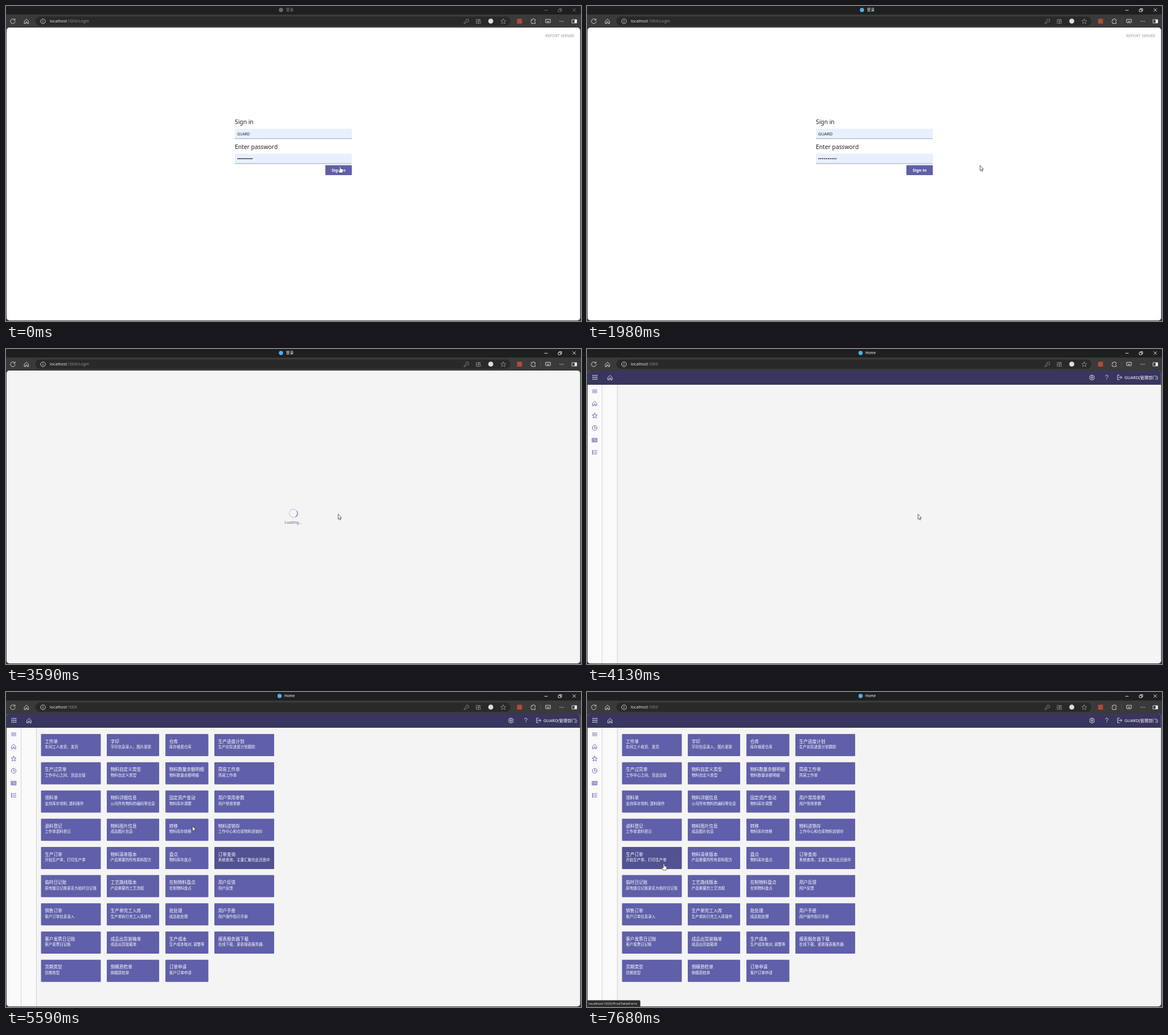
These frames come from a looping animation (1010 px wide and 555 px high, 8 s). An HTML page:

```html
<!DOCTYPE html>
<html lang="zh-CN">
<head>
<meta charset="utf-8">
<title>Home</title>
<style>
html, body { margin: 0; width: 100%; height: 100%; overflow: hidden; background: #3a3a3a; }
svg { display: block; width: 1010px; height: 555px; }
text { font-family: "Noto Sans", "Noto Sans CJK SC", "Noto Sans CJK", sans-serif; white-space: pre; }
.ico { fill: none; stroke: #ddd; stroke-width: .9; stroke-linecap: round; stroke-linejoin: round; }
.dim { stroke: #8c8c8c; }
.rail { stroke: #5c5bb0; }
.white { stroke: #eee; }
</style>
</head>
<body>
<svg id="stage" viewBox="0 0 1010 555" xmlns="http://www.w3.org/2000/svg"></svg>
<script>
const LOOP = 8000, PURPLE = '#605fa9', HOVER = '#525192', PRESSED = '#4a4985';
const USER = 'GUARD';

const text = (x, y, size, fill, s, more = '') =>
  `<text x="${x}" y="${y}" font-size="${size}" fill="${fill}" ${more}>${s}</text>`;
const rect = (x, y, w, h, fill, more = '') =>
  `<rect x="${x}" y="${y}" width="${w}" height="${h}" fill="${fill}" ${more}/>`;
const icon = (x, y, d, cls = '') =>
  `<path class="ico ${cls}" transform="translate(${x} ${y})" d="${d}"/>`;

const STAR = 'M0 -4.6L1.3 -1.4 4.5 -1.3 2 .9 2.9 4.1 0 2.3 -2.9 4.1 -2 .9 -4.5 -1.3 -1.3 -1.4Z';
const HOUSE = 'M-3.6 -.4L0 -3.9 3.6 -.4V4H1.2V1H-1.2V4H-3.6Z';
const circle = r => `M${-r} 0a${r} ${r} 0 1 1 ${2 * r} 0a${r} ${r} 0 1 1 ${-2 * r} 0`;

// Tile columns: x, width, then "title/subtitle" (subtitle defaults to title)
const columns = [
  [61.5, 105, '工作单/车间工人收货、发货 生产过货单/工作中心之间、货品交接 领料单/支持库存领料,_退料操作 退料登记/工作单退料登记 生产订单/开始生产单，打印生产单 临时日记账/原电镀日记账更名为临时日记账 销售订单/客户订单信息录入 客户发票日记账 货期类型'],
  [177, 92, '字印/字印信息录入，图片更新 物料自定义类型 物料详细信息/公司所有物料的编码等信息 物料图片信息/成品图片信息 物料清单版本/产品需要的所有原料配方 工艺路线版本/产品需要的工艺流程 生产单完工入库/生产单执行完工入库操作 成品出货装箱单 倒模质检单'],
  [280, 75.5, '仓库/库存维度仓库 物料数量余额明细 固定资产变动/物料库存调整 转移/物料库存转移 盘点/物料库存盘点 在制物料盘点 批处理/成品批处理 生产成本/生产成本核对,_调整等 订单申请/客户订单申请'],
  [366, 105, '生产进度计划/生产实际进度计划跟踪 简易工作单 用户常用参数 物料进销存/工作中心和仓库物料进销存 订单查询/系统查询，主要汇聚在此页面中 用户反馈 用户手册/用户操作指引手册 报表服务器下载/在线下载、更新报表服务器.']
];
const tiles = columns.flatMap(([x, w, list]) => list.split(' ').map((item, i) => {
  const [title, sub = title] = item.replace('_', ' ').split('/');
  return { x, y: 74 + 49.72 * i, w, h: 39, title, sub };
}));
const button = { x: 561, y: 280.5, w: 46.5, h: 17.5 };

const chrome =
  rect(0, 0, 1010, 555, '#3a3a3a') + rect(0, 0, 1010, 15, '#1e2020') +
  rect(51, 18, 835.5, 17.5, '#292929', 'rx="8.7" stroke="#444" stroke-width=".6"') +
  icon(12, 27, 'M3.6 -2.3A4.2 4.2 0 1 0 4.2 .4M3.8 -4.4V-2H1.4') +
  icon(36, 27, HOUSE) +
  icon(65, 27, circle(4.2) + 'M0 -.4V2M0 -2V-1.9') +
  icon(808.5, 27, 'M-3.8 3.8V2.2L-.6 -.8A2.5 2.5 0 1 1 1.2 1L-.6 2.4 -2 3.8Z', 'dim') +
  icon(830, 27, 'M-3.6 -3.4H-.2V3.6H-3.6ZM-3.6 .1H3.4V3.6H-.2M2 -4V-.8M.4 -2.4H3.6', 'dim') +
  '<circle cx="851.5" cy="26.7" r="4.4" fill="#ddd"/>' +
  icon(873.5, 27, STAR, 'dim') +
  rect(897.7, 22.5, 8.6, 8.6, '#b5483c') +
  icon(926, 27, 'M-3 -3H-1A1.5 1.5 0 0 1 2 -3H3.5V-.8A1.4 1.4 0 0 0 3.5 1.8V3.8H-3V1.8A1.5 1.5 0 0 1 -3 -1Z') +
  rect(938.6, 22, .8, 10, '#555') +
  icon(952, 27, 'M-2 2H-4.2V-3.6H4.2V2H2M-1.8 -1.2L1.8 3.4M1.8 -1.2L-1.8 3.4') +
  [-3, 0, 3].map(d => `<circle cx="${976 + d}" cy="27" r=".75" fill="#ddd"/>`).join('') +
  icon(998.5, 27, 'M-4 -3H4V3H-4Z') + rect(998.7, 24, 3.8, 6, '#eee') +
  `<g id="buttons" class="ico">
    <path d="M946 7.5h5M970.5 6h4v4h-4zM972 6V4.6h4V8.600h-1.500M995.600 4.600l5 5M1000.600 4.600l-5 5"/></g>
  <circle id="gem" cy="7" r="3.7"/>
  <text id="title" y="9.3"></text>
  <text x="77" y="29.300" font-size="7.06" fill="#e6e6e6">localhost<tspan id="path" fill="#929292"></tspan></text>`;

const field = y => rect(402, y, 205.5, 18, '#e8f0fd') + rect(402, y + 17.4, 205.5, .8, '#8794b4');
const login = '<g id="login">' + rect(1, 38, 1007.5, 516, '#fff', 'rx="5"') +
  text(947, 54.6, 6.8, '#9a9a9a', 'REPORT SERVER') +
  text(402, 208, 10.3, '#222', 'Sign in') + field(216) +
  text(402, 252, 10.3, '#222', 'Enter password') + field(260) +
  text(406, 228, 7.4, '#222', USER, 'id="user"') + '<g id="dots" fill="#222"></g>' +
  rect(button.x, button.y, button.w, button.h, PURPLE, 'id="button" rx="1"') +
  text(584.2, 291.8, 7.3, '#fff', 'Sign in', 'text-anchor="middle" font-weight="600"') + '</g>';

const header = '<path d="M1 63V43a5 5 0 0 1 5 -5H1003.500a5 5 0 0 1 5 5V63Z" fill="#38365f"/>' +
  Array.from({ length: 9 }, (_, i) =>
    rect(9.8 + 3.3 * (i % 3), 45.8 + 3.3 * (i / 3 | 0), 1.7, 1.7, '#fff')).join('') +
  icon(40.5, 50.3, HOUSE, 'white') +
  icon(887, 50.3, circle(1.5) + 'M-1 -4.3H1L1.5 -3 3 -3.300 4.200 -1.600 3.400 0 4.200 1.600 3 3.300 1.500 3 1 4.300H-1L-1.500 3 -3 3.300 -4.200 1.600 -3.400 0 -4.200 -1.600 -3 -3.300 -1.500 -3Z', 'white') +
  icon(913, 50, 'M-2 -2.2A2 2 0 1 1 1.300 -.6Q0 .3 0 1.600M0 3.700V3.800', 'white') +
  icon(935.5, 50, 'M-.5 -4H-3.500V4H-.5M-1.500 0H4M1.800 -2.200L4 0 1.800 2.200', 'white') +
  text(944, 53, 7.35, '#fff', USER + '(管理部门)');

const rail = [
  'M-4 -2.4H4M-4 0H4M-4 2.400H4', HOUSE, STAR, circle(4.2) + 'M0 -2.600V.3H2.300',
  'M-4.200 -3.200H4.200V3.400H-4.200ZM-4.200 -1.400H4.200M-2.600 .2H-.4V2H-2.600ZM1 .2H2.800M1 2H2.800',
  'M-3.800 -3.600V3.600M-3.800 -3H-2.400M-3.800 0H-2.400M-3.800 3H-2.400M-.8 -3H4M-.8 0H4M-.8 3H4'
].map((d, i) => icon(13.5, 74.5 + 21.5 * i, d, 'rail')).join('');

const home = rect(1, 38, 1007.5, 516, '#f4f4f4', 'id="gray" rx="5"') + '<g id="home">' +
  '<path d="M1 63H27V554H6a5 5 0 0 1 -5 -5Z" fill="#fafafa"/>' + rect(26.2, 63, .9, 491, '#cacaca') +
  '<g id="panel">' + rect(27, 63, 26, 491, '#fafafa') + rect(52.8, 63, .9, 491, '#cacaca') + '</g>' +
  header + rail + '<g id="tiles">' + tiles.map(b =>
    rect(b.x, b.y, b.w, b.h, PURPLE, 'class="tile" rx="1"') +
    text(b.x + 6.7, b.y + 15.7, 7.65, '#fff', b.title) +
    text(b.x + 6.7, b.y + 25.2, 6.5, '#fff', b.sub)).join('') + '</g></g>';

const overlay = `<g id="loading" fill="none" stroke-width="1.1">
    <circle cx="504.8" cy="289.5" r="7.4" stroke="#c9c8e2"/>
    <path id="arc" d="M0 -7.4A7.4 7.4 0 0 1 7.400 0" stroke="#5b5a98"/>
    ${text(504.5, 308.2, 6.5, '#66658f', 'Loading...', 'text-anchor="middle"')}</g>
  <g id="status"><path id="bar" fill="#2b2b2b" stroke="#555" stroke-width=".5"/>
    ${text(3, 550.8, 5.95, '#e2e2e2', '', 'id="link"')}</g>
  <circle id="click" cx="692.5" cy="280.5" r="6.3" fill="#ffe95a" fill-opacity=".5"/>
  <g id="cursor" fill="#fff" stroke="#222" stroke-width=".7" stroke-linejoin="round">
    <path id="arrow" d="M.4 0V9L2.400 7.200 3.800 10.300 5.200 9.700 3.800 6.700H6.500Z"/>
    <path id="hand" d="M-1 1Q0 -.9 1 1V4.600L4 5.300Q5 5.600 5 6.600V8.500Q5 10.500 4 12H-1.300L-3.700 8Q-3.700 6.600 -2.400 7.100L-1 8.300Z"/></g>`;

document.getElementById('stage').innerHTML = chrome + login + home + overlay;
const $ = id => document.getElementById(id);
const tileRects = document.querySelectorAll('.tile');
const show = (id, on) => $(id).style.display = on ? '' : 'none';
const set = (id, attrs) => { for (const k in attrs) $(id).setAttribute(k, attrs[k]); };

// Pointer path: time, x, y
const path = [
  [0, 587, 282], [265, 587, 282], [600, 692, 281], [1910, 692, 281], [1980, 690, 281],
  [2300, 632, 297], [2640, 583, 291], [3590, 583, 291], [3650, 581, 291], [5040, 581, 291],
  [5110, 576, 292], [5200, 571, 293], [5380, 571, 293], [5450, 555, 296], [5520, 430, 308],
  [5590, 327, 236], [5800, 195, 135], [6150, 122, 92], [6210, 122, 92], [6620, 114, 145],
  [6830, 114, 145], [7020, 116, 183], [7480, 133, 297], [7680, 135, 302], [8000, 135, 302]
];
function pointer(t) {
  const i = Math.max(0, path.findIndex(p => p[0] > t) - 1);
  const [t0, x0, y0] = path[i], [t1, x1, y1] = path[i + 1];
  const k = Math.floor((t - t0) / 67) * 67 / (t1 - t0);
  return [x0 + (x1 - x0) * k, y0 + (y1 - y0) * k];
}
const over = ([x, y]) => b => x >= b.x && x <= b.x + b.w && y >= b.y && y <= b.y + b.h;

function draw(t) {
  const onLogin = t < 3130, onHome = t >= 3920, active = t >= 70, filled = t >= 1200;
  set('buttons', { stroke: active ? '#eee' : '#777' });
  $('buttons').style.stroke = active ? '#eee' : '#777';
  set('gem', { cx: onHome ? 480.5 : 483, fill: active ? '#4fb0e6' : '#666a70' });
  set('title', { x: onHome ? 489 : 491.8, 'font-size': onHome ? 6.4 : 6.6, fill: active ? '#fff' : '#8a8a8a' });
  $('title').textContent = onHome ? 'Home' : '登录';
  $('path').textContent = onHome ? ':1003' : ':1003/Login';

  show('login', onLogin);
  show('gray', !onLogin);
  show('home', onHome);
  show('panel', t >= 4000);
  show('tiles', t >= 4450);
  show('loading', t >= 3200 && t < 4130);
  show('click', t >= 1200 && t < 1390);

  set('user', { 'font-size': filled ? 7.4 : 6.5 });
  $('dots').innerHTML = Array.from({ length: 10 }, (_, i) =>
    `<circle cx="${407.5 + i * (filled ? 3.3 : 2.75)}" cy="269" r="1.1"/>`).join('');
  set('button', { fill: t >= 2920 ? PRESSED : PURPLE });
  set('arc', { transform: `translate(504.8 289.5) rotate(${60 + (t - 3590) * 360 / 1300})` });

  // Hover and cursor shape lag behind the pointer
  const targets = onLogin ? [button] : t >= 4450 ? tiles : [];
  const hovered = tiles.findIndex(over(pointer(Math.max(0, t - 70))));
  tileRects.forEach((r, i) => r.setAttribute('fill', i === hovered ? HOVER : PURPLE));
  const hand = targets.some(over(pointer(Math.max(0, t - 140))));
  show('hand', hand);
  show('arrow', !hand);
  set('cursor', { transform: `translate(${pointer(t)})` });

  show('status', t >= 6410);
  const late = t >= 7480, w = late ? 93.5 : 117.5;
  set('bar', { d: `M0 555V543.200H${w - 2}q2 0 2 2V555Z` });
  $('link').textContent = 'localhost:1003/' + (late ? 'ProdTableForm' : 'JaxProdMoveTableForm');
}

function frame() {
  draw(performance.now() % LOOP);
  requestAnimationFrame(frame);
}
frame();
</script>
</body>
</html>
```
